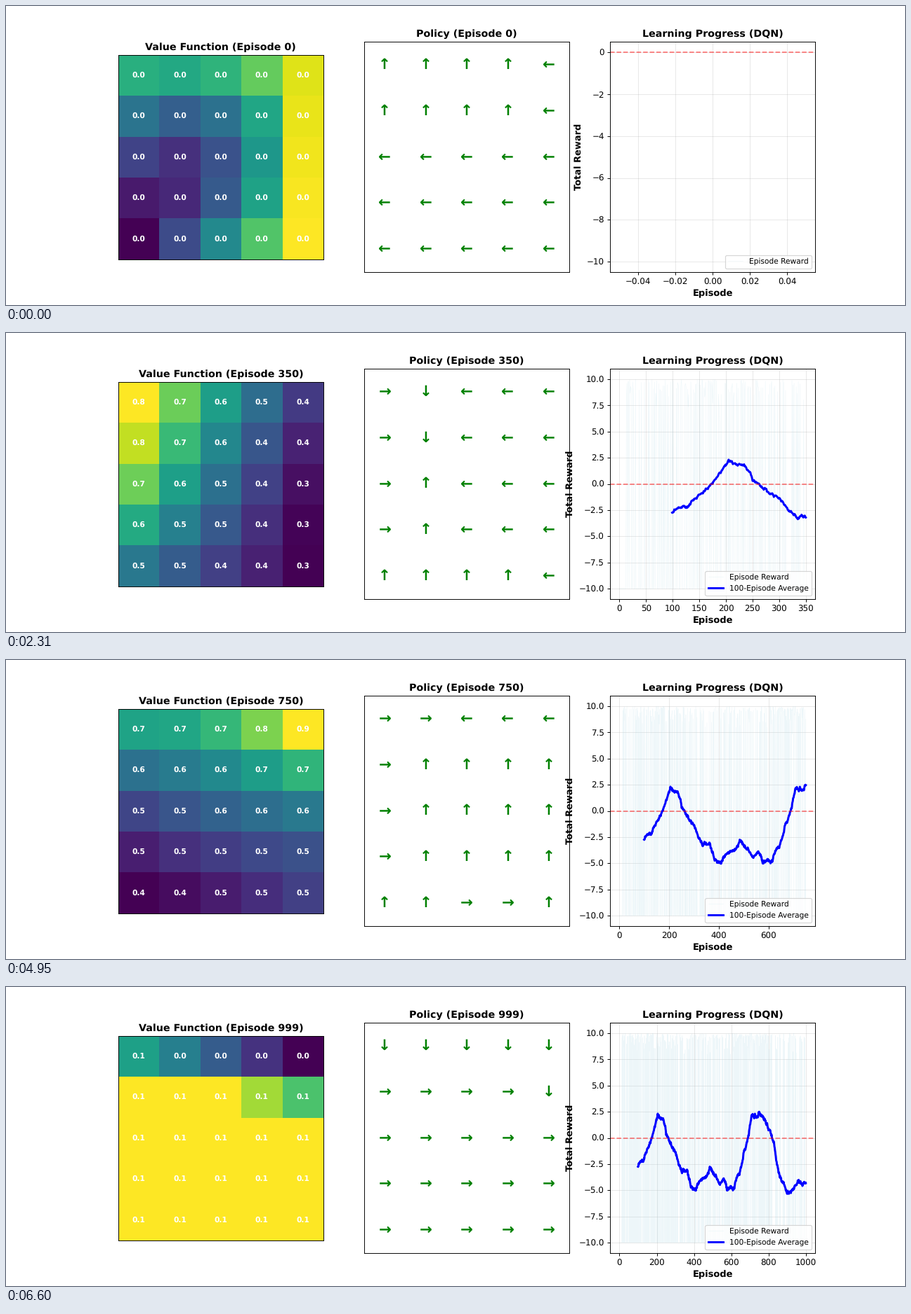
Write a matplotlib script that moves like this. It is 1280x427 px and loops after 6.93 s.

```python
import numpy as np
import matplotlib.pyplot as plt
from matplotlib.animation import FuncAnimation

plt.rcParams["text.hinting"] = "none"

N = 5
FRAMES, STEP, LAST = 21, 50, 999
ARROWS = {"U": "↑", "D": "↓", "L": "←", "R": "→"}
BOLD = dict(fontweight="bold")

row, col = np.mgrid[:N, :N]
late = 0.2 + 0.6 * (row + col) / (2 * N - 2)

# Quadratic basis through both edges and the middle of the grid
w = np.linspace(-1, 1, N)
basis = np.array([w * (w - 1) / 2, 1 - w * w, w * (w + 1) / 2])


def state(episode, low, high, top, middle, bottom, moves):
    """Smooth value surface through 3x3 control points, plus moves by row."""
    heat = np.clip(basis.T @ np.array([top, middle, bottom]) @ basis, 0, 1)
    return episode, low + (high - low) * heat, np.array([list(r) for r in moves.split()])


STATES = [
    state(0, 0.0, 0.04, (0.63, 0.65, 0.95), (0.20, 0.25, 0.98), (0.0, 0.47, 1.0),
          "UUUUL UUUUL LLLLL LLLLL LLLLL"),
    state(200, 0.24, 0.77, (0.29, 0.20, 0.54), (0.14, 0.37, 0.68), (0.02, 0.64, 1.0),
          "DDRDD DDRDD DRRDD RRUUU RRUUU"),
    state(350, 0.31, 0.83, (1.0, 0.56, 0.17), (0.78, 0.37, 0.04), (0.40, 0.19, 0.0),
          "RDLLL RDLLL RULLL RULLL UUUUL"),
    state(500, 0.03, 0.19, (1.0, 0.52, 0.14), (0.53, 0.36, 0.03), (0.09, 0.27, 0.30),
          "DDDDD RRUDD RRRUD RRRUU URRUU"),
    state(600, -0.1985, -0.0045, (0.58, 0.54, 0.26), (0.90, 0.47, 0.12), (1.0, 0.46, 0.0),
          "LLLLL LLLLL LLLUU RRRUU RRRRU"),
    state(850, 0.70, 1.56, (0.58, 0.66, 1.0), (0.20, 0.36, 0.49), (0.0, 0.15, 0.32),
          "RRLLL RUUUU RUUUU RUUUU UUUUU"),
    state(999, 0.01, 0.09, (0.57, 0.29, 0.0), (2.0, 1.72, 1.43), (3.43, 3.15, 2.86),
          "DDDDD RRRRD RRRRR RRRRR RRRRR"),
]

# Turning points of the running average: (episode, reward)
TREND = np.array([
    (99, -2.5), (130, -1.9), (165, -0.3), (208, 2.1), (230, 2.1), (265, -0.2),
    (300, -1.5), (333, -3.2), (365, -3.2), (385, -4.7), (411, -4.9), (435, -3.8),
    (455, -3.8), (488, -2.7), (535, -4.2), (558, -3.8), (580, -4.9), (615, -4.6),
    (645, -3.3), (690, 0.2), (712, 2.1), (750, 2.3), (790, 1.5), (825, -0.2),
    (860, -3.8), (907, -5.5), (950, -4.4), (999, -4.3)])

rng = np.random.default_rng(7)
steps = np.arange(LAST + 1)
wobble = np.convolve(rng.normal(0, 0.075, steps.size), 0.85 ** np.arange(20))[:steps.size]
average = np.interp(steps, *TREND.T) + wobble

# Each episode either reaches the goal quickly or fails at -10
chance = (np.interp(steps + 50, *TREND.T) + 10) / 19.5
wins = (rng.random(steps.size) < chance) & (steps > 10)
rewards = np.where(wins, 10 - np.minimum(rng.exponential(0.7, steps.size), 4), -10.0)


def snapshot(episode):
    """Blend the two neighbouring states; moves flip cell by cell."""
    for (e0, v0, m0), (e1, v1, m1) in zip(STATES, STATES[1:]):
        if episode <= e1:
            t = (episode - e0) / (e1 - e0)
            return v0 + (v1 - v0) * t, np.where(t > late, m1, m0)


def draw_values(ax, values, episode):
    ax.imshow(values, cmap="viridis")
    for r, c in np.ndindex(N, N):
        ax.text(c, r, f"{values[r, c]:.1f}", ha="center", va="center",
                color="white", fontsize=9, **BOLD)
    ax.set_title(f"Value Function (Episode {episode})", fontsize=12, **BOLD)
    ax.set(xticks=[], yticks=[])


def draw_policy(ax, moves, episode):
    for r, c in np.ndindex(N, N):
        ax.text(c + 0.5, N - r - 0.5, ARROWS[moves[r, c]], ha="center", va="center",
                color="green", fontsize=18, **BOLD)
    ax.set_title(f"Policy (Episode {episode})", fontsize=12, **BOLD)
    ax.set(xlim=(0, N), ylim=(0, N), xticks=[], yticks=[])


def draw_progress(ax, episode):
    n = episode + 1
    ax.plot(steps[:n], rewards[:n], color="lightblue", alpha=0.22, lw=0.5,
            label="Episode Reward")
    if n >= 100:
        ax.plot(steps[99:n], average[99:n], color="blue", lw=2.5,
                label="100-Episode Average")
    ax.axhline(0, color="red", ls="--", alpha=0.5)
    ax.set_title("Learning Progress (DQN)", fontsize=12, **BOLD)
    ax.set_xlabel("Episode", fontsize=11, **BOLD)
    ax.set_ylabel("Total Reward", fontsize=11, **BOLD)
    ax.grid(True, alpha=0.3)
    ax.legend(loc="lower right", fontsize=9)


dpi = 1280 / 15
fig, axes = plt.subplots(1, 3, figsize=(15, 427 / dpi), dpi=dpi)


def update(i):
    episode = min(STEP * i, LAST)
    values, moves = snapshot(episode)
    for ax in axes:
        ax.clear()
    draw_values(axes[0], values, episode)
    draw_policy(axes[1], moves, episode)
    draw_progress(axes[2], episode)


anim = FuncAnimation(fig, update, frames=FRAMES, init_func=lambda: None,
                     interval=330, repeat=True, repeat_delay=0)
plt.show()
```
